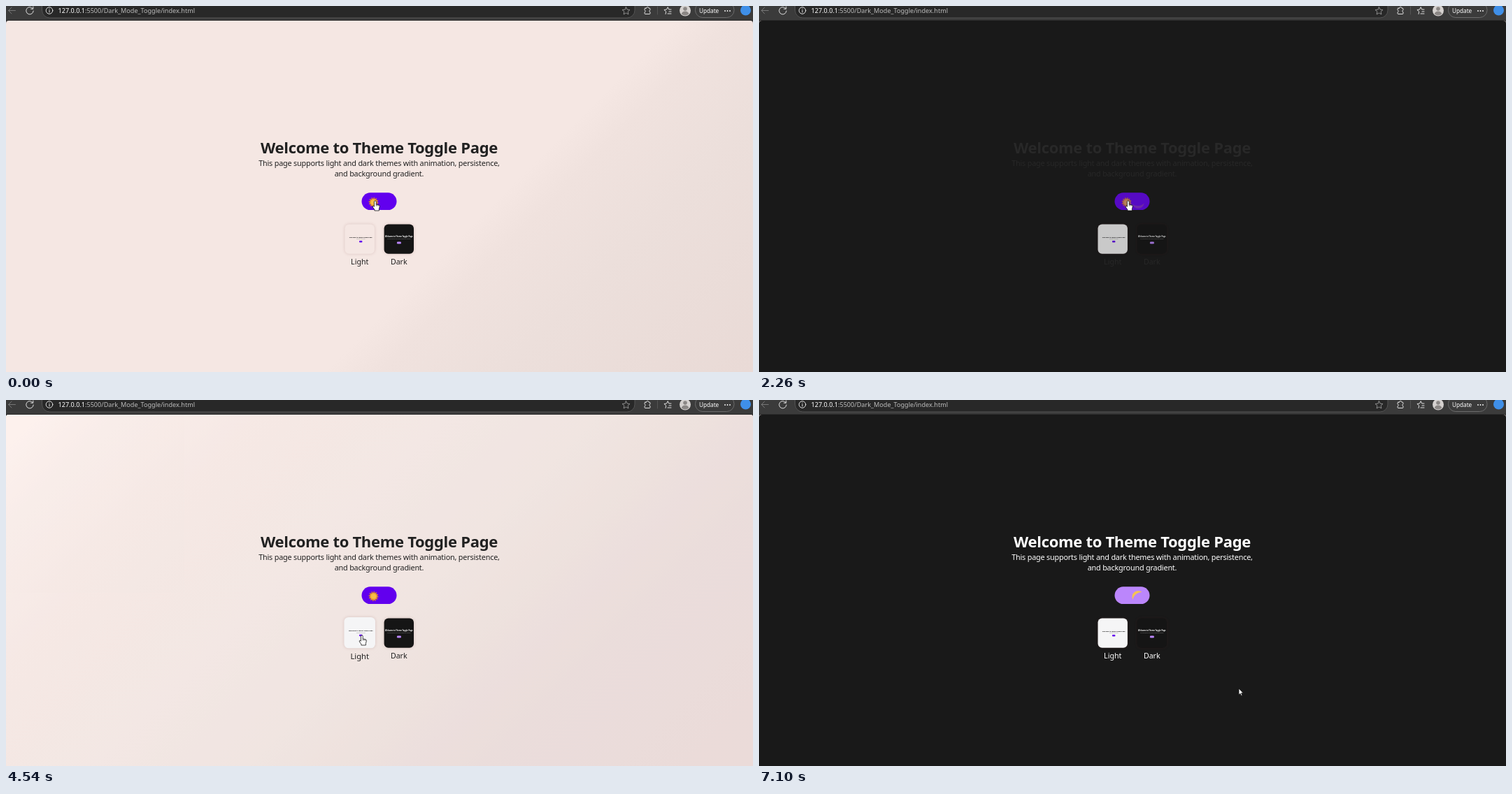
An HTML page for the animation above (8000 ms loop, 1068 px wide and 524 px high).

```html
<!DOCTYPE html>
<html lang="en">
<head>
<meta charset="utf-8">
<title>Theme toggle</title>
<style>
@property --dark { syntax: "<number>"; inherits: true; initial-value: 0; }
@property --moon { syntax: "<number>"; inherits: true; initial-value: 0; }

html, body { margin: 0; width: 100%; height: 100%; overflow: hidden; background: #3b3b3b; }
#stage { position: relative; width: 1068px; height: 524px; overflow: hidden; --t: 0; }
svg { position: absolute; inset: 0; font-family: "Noto Sans", "Open Sans", sans-serif; }

/* Scripts set --t; every paused animation is sought to it. */
.anim {
  animation: 8000ms linear infinite paused;
  animation-delay: calc(var(--t) * -1ms);
}

.bg { position: absolute; inset: 21px 0 0; border-radius: 4px 4px 0 0; }
.calm { background: linear-gradient(135deg, #f5e7e3 61%, #f0e2de 66%, #ecdfdb 77%, #e9dad6); }
.warm { background: linear-gradient(135deg, #fef1ed 2%, #f6e9e5 10%, #f6e8e4 52%, #f2e2df 57%, #edd9d7 68%, #ecd6d4); animation-name: warm; }
.rest { background: linear-gradient(135deg, #fdf0ec 3%, #f6e9e5 10%, #f4e6e2 26%, #f3e7e3 40%, #f1e5e1 54%, #ecdfdc 68%, #eadad7); animation-name: rest; }
.pale { background: linear-gradient(135deg, #fdf3f0 11%, #f7ece8 23%, #f1e7e3 45%, #ede1de 66%, #eadcdb 75%, #ebdcdc); animation-name: pale; }
.night { background: #191919; animation-name: night; }

@keyframes warm { 0%, 22.8% { opacity: 0 } 22.875% { opacity: .5 } 25.375%, 100% { opacity: 1 } }
@keyframes rest { 0%, 48.7% { opacity: 0 } 48.75%, 100% { opacity: 1 } }
@keyframes pale { 0%, 48.7% { opacity: 0 } 48.75% { opacity: 1 } 61.375%, 100% { opacity: 0 } }
@keyframes night {
  0%, 28.2% { opacity: 0 } 28.25%, 48.7% { opacity: 1 }
  48.75%, 74.9% { opacity: 0 } 75%, 100% { opacity: 1 }
}

.content { animation-name: theme; fill: color-mix(in srgb, #212121, #fff calc(var(--dark) * 100%)); }
@keyframes theme {
  0%, 28.2% { --dark: 0; --moon: 0; opacity: 1 }
  28.25% { --dark: .05; --moon: .2; opacity: .8 }
  31.625%, 48.7% { --dark: 1; --moon: 1; opacity: 1 }
  48.75% { --dark: .7; --moon: .5; opacity: .65 }
  51% { --dark: .3; --moon: .15; opacity: .8 }
  53.375%, 74.9% { --dark: 0; --moon: 0; opacity: 1 }
  75% { --dark: .05; --moon: .2; opacity: .8 }
  77.25% { --dark: .6; --moon: .7; opacity: .85 }
  79.5%, 100% { --dark: 1; --moon: 1; opacity: 1 }
}
.title { font-size: 22px; font-weight: 700; letter-spacing: -.3px; }
.copy { font-size: 10.8px; letter-spacing: -.18px; }
.label { font-size: 10.6px; }
.mid { text-anchor: middle; }
.pill { fill: color-mix(in srgb, #6200ee, #bb86fc calc(var(--dark) * 100%)); }
.sun { opacity: calc(1 - var(--moon)); transform: rotate(calc(var(--moon) * 180deg)); }
.moon { opacity: var(--moon); transform: rotate(calc((var(--moon) - 1) * 180deg)); }

.thumb { filter: drop-shadow(0 0 2px rgba(90, 20, 20, .16)); }
.white { animation-name: white; }
@keyframes white { 0%, 6.6% { fill: #f5e7e3 } 6.625%, 100% { fill: #f5f5f6 } }
.hover-light { animation-name: hover-light; }
.hover-dark { animation-name: hover-dark; }
@keyframes hover-light {
  0%, 39% { transform: scale(1) } 42.6%, 64.5% { transform: scale(1.05) } 68%, 100% { transform: scale(1) }
}
@keyframes hover-dark {
  0%, 67% { transform: scale(1) } 70.375%, 83% { transform: scale(1.05) }
  86.125% { transform: scale(1.03) } 88.75%, 100% { transform: scale(1) }
}

.cursor { animation-name: move; }
@keyframes move {
  0%, 31.5% { transform: translate(528px, 279px) }
  44.125%, 61.375% { transform: translate(509px, 337px) }
  70.375%, 79.5% { transform: translate(561.5px, 338.5px) }
  86.125%, 100% { transform: translate(686px, 413px) }
}
.hand { animation-name: hand; }
.arrow { animation-name: arrow; }
@keyframes hand {
  0%, 34.5% { opacity: 1 } 34.6%, 38.8% { opacity: 0 } 38.9%, 64.4% { opacity: 1 }
  64.5%, 66.8% { opacity: 0 } 66.9%, 80.6% { opacity: 1 } 80.7%, 100% { opacity: 0 }
}
@keyframes arrow {
  0%, 34.5% { opacity: 0 } 34.6%, 38.8% { opacity: 1 } 38.9%, 64.4% { opacity: 0 }
  64.5%, 66.8% { opacity: 1 } 66.9%, 80.6% { opacity: 0 } 80.7%, 100% { opacity: 1 }
}
</style>
</head>
<body>
<div id="stage">
  <div class="bg calm"></div>
  <div class="bg warm anim"></div>
  <div class="bg rest anim"></div>
  <div class="bg pale anim"></div>
  <div class="bg night anim"></div>

  <svg width="1068" height="524" viewBox="0 0 1068 524">
    <!-- browser bar -->
    <rect y="20" width="1068" height="1" fill="#2c2c2c"/>
    <rect x="51.5" y="-12" width="847.5" height="29" rx="11" fill="#282828" stroke="#545454"/>
    <g fill="none" stroke="#e0e0e0" stroke-linecap="round" stroke-linejoin="round">
      <path d="M13.5 6.5H3.5M8 2L3.5 6.5L8 11" stroke="#777"/>
      <path d="M38.3 3.8A5.2 5.2 0 1 0 39.2 7M38.8 1V4.2H35.6"/>
      <circle cx="62" cy="6.5" r="4.8"/>
      <path d="M62 6V9M62 4V4.1"/>
      <path d="M886.5 1.5l1.6 3.6 3.9.4-2.9 2.6.8 3.9-3.4-2-3.4 2 .8-3.9-2.9-2.6 3.9-.4z" stroke="#8e8e8e"/>
      <path d="M914 3.2h1.6a1.7 1.7 0 0 1 3.4 0H920q1 0 1 1v1.5a1.7 1.7 0 0 0 0 3.2v1.6q0 1-1 1h-6q-1 0-1-1V9a1.7 1.7 0 0 0 0-3.2V4.2q0-1 1-1z"/>
      <path d="M931.5 1V12" stroke="#555"/>
      <path d="M943 11.5l.7-3.5-2.8-2.5 3.6-.5 1.7-3.4 1.6 3.4H951M948 8h3M946 11h5"/>
      <rect x="985.5" y="-5" width="55.5" height="21.5" rx="10.5" stroke="#6b6b6b"/>
    </g>
    <g font-size="9.1" fill="#fff">
      <text x="74.5" y="10">127.0.0.1<tspan fill="#bdbdbd">:5500/Dark_Mode_Toggle/index.html</tspan></text>
      <text x="991" y="9.7" font-size="8.2">Update</text>
      <circle cx="1028" cy="7" r=".9"/><circle cx="1031.5" cy="7" r=".9"/><circle cx="1035" cy="7" r=".9"/>
    </g>
    <circle cx="971" cy="6.5" r="8" fill="#d6d2d0"/>
    <circle cx="971" cy="4" r="2.8" fill="#8b8785"/>
    <path d="M965.8 11.5a5.2 4 0 0 1 10.4 0a8 8 0 0 1-10.4 0z" fill="#8b8785"/>
    <circle cx="1057.5" cy="6" r="7.5" fill="#3f8fe8"/>

    <!-- page -->
    <g class="content anim">
      <g class="mid">
        <text class="title" x="533.5" y="211">Welcome to Theme Toggle Page</text>
        <text class="copy" x="533.5" y="229">This page supports light and dark themes with animation, persistence,</text>
        <text class="copy" x="533.5" y="244">and background gradient.</text>
      </g>

      <rect class="pill" x="508.5" y="267.3" width="50" height="24.7" rx="12.3"/>
      <g transform="translate(525.5 281)">
        <g class="sun">
          <circle r="5.7" fill="none" stroke="#e08a1e" stroke-width="2.4" pathLength="24" stroke-dasharray="1 1"/>
          <circle r="5.3" fill="#efa52c"/>
          <circle r="3.6" fill="#f7bd4a"/>
        </g>
      </g>
      <g transform="translate(542 281.5)">
        <path class="moon" d="M-7.5 4.5A8.7 8.7 0 0 1 5.5-6.5A13 13 0 0 0-7.5 4.5Z" fill="#f6c450"/>
      </g>

      <g transform="translate(505.7 342)">
        <g class="hover-light anim mid">
          <rect class="thumb white anim" x="-21.2" y="-29.5" width="42.4" height="42.2" rx="6"/>
          <g fill="#111">
            <text x="1.5" y="-10.4" font-size="2.1" font-weight="700">Welcome to Theme Toggle Page</text>
            <text x="1.5" y="-8" font-size="1.1" fill="#777">This page supports light</text>
          </g>
          <rect x="-.7" y="-6" width="4.4" height="2.4" rx="1" fill="#6200ee"/>
          <text class="label" y="28">Light</text>
        </g>
      </g>
      <g transform="translate(561.8 342)">
        <g class="hover-dark anim mid">
          <rect class="thumb" x="-21.2" y="-29.5" width="42.4" height="42.2" rx="6" fill="#151515"/>
          <g fill="#fff">
            <text y="-10.6" font-size="2.5" font-weight="700">Welcome to Theme Toggle Page</text>
            <text y="-8" font-size="1.25" fill="#999">This page supports light and dark themes with animation</text>
          </g>
          <rect x="-2.9" y="-4.4" width="6" height="3" rx="1.3" fill="#bb86fc"/>
          <text class="label" y="28">Dark</text>
        </g>
      </g>
    </g>

    <g class="cursor anim" fill="#fff" stroke="#111" stroke-width=".8" stroke-linejoin="round">
      <g class="hand anim">
        <path d="M-1.6 1.2C-1.6-.5 1.2-.5 1.2 1.2V5L4.9 5.7Q6.5 6.1 6.3 7.9L5.4 11.6V14H-1.1V12.5L-3.7 9Q-4.1 7.2-2.7 7.2L-1.6 8.3Z"/>
        <path d="M1.2 5V7.5M3 5.6V7.5M4.8 6V7.6" fill="none" stroke-width=".6"/>
      </g>
      <path class="arrow anim" d="M0 0V9.2L2.1 7.3L3.5 10.4L5 9.7L3.6 6.7H6.4Z"/>
    </g>
  </svg>
</div>
<script>
const LOOP = 8000;
// The screen refreshes only at these moments and holds in between.
const beats = [
  0, 530, 730, 1090, 1830, 2030, 2260,
  2530, 2730, 2930, 3130, 3330, 3530,
  3900, 4080, 4270, 4480, 4700, 4910,
  5100, 5280, 5450, 5630,
  6000, 6180, 6360, 6530, 6710, 6890, 7100
];
const stage = document.getElementById("stage");
const start = performance.now();

function draw() {
  const t = (performance.now() - start) % LOOP;
  stage.style.setProperty("--t", beats.findLast(b => b <= t) ?? 0);
  requestAnimationFrame(draw);
}
draw();
</script>
</body>
</html>
```
